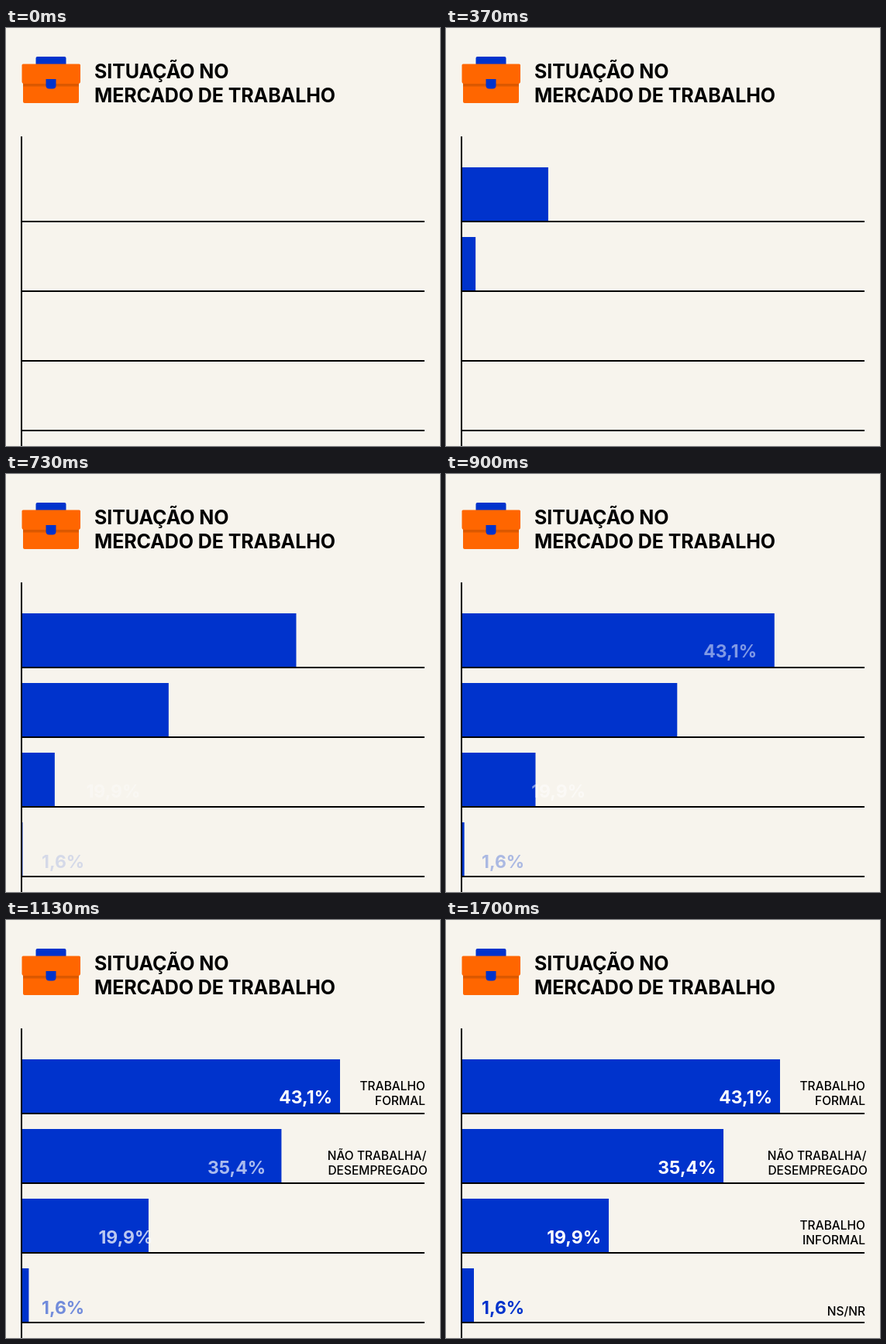
Write an HTML page that moves like this. It is 560x540 px and loops after 1.76 s.

```html
<!DOCTYPE html>
<html lang="pt-BR">
<head>
<meta charset="utf-8">
<title>Situação no mercado de trabalho</title>
<style>
  html, body { margin: 0; width: 100%; height: 100%; overflow: hidden; background: #f7f4ed; }
  svg { display: block; width: 560px; height: 540px; font-family: Inter, "Open Sans", sans-serif; }
  .title { font-size: 25px; font-weight: 700; letter-spacing: -.1px; }
  .value { font-size: 23px; font-weight: 700; }
  .label { font-size: 15.5px; font-weight: 500; }
  .value, .label { opacity: 0; }
  .end { text-anchor: end; }
  .white { fill: #fff; }
  .blue { fill: #0033cc; }
  .orange { fill: #ff6600; }
</style>
</head>
<body>
<svg viewBox="0 0 560 540">
  <g id="briefcase">
    <path class="blue" d="M38.500 47V39q0-2 2-2H75.500q2 0 2 2V47z"/>
    <path class="orange" d="M22 70H94V95q0 2-2 2H24q-2 0-2-2z"/>
    <path fill="#db5800" d="M22 69H94V75.500H22z"/>
    <path class="orange" d="M20.500 48q0-1.500 1.500-1.500H94.500q1.500 0 1.500 1.500V69q0 3-3 3H23.500q-3 0-3-3z"/>
    <path class="blue" d="M51.500 66H64.500V74q0 4.500-4.500 4.500H56q-4.500 0-4.500-4.500z"/>
  </g>
  <g class="title">
    <text x="114" y="65">SITUAÇÃO NO</text>
    <text x="114" y="96">MERCADO DE TRABALHO</text>
  </g>

  <g class="blue">
    <rect class="bar" x="21" y="180" height="70"/>
    <rect class="bar" x="21" y="270" height="70"/>
    <rect class="bar" x="21" y="360" height="70"/>
    <rect class="bar" x="21" y="450" height="70"/>
  </g>
  <path stroke="#000" stroke-width="2" d="M20 140V540M20 250H540M20 340H540M20 430H540M20 520H540"/>

  <text class="value white end" x="421" y="237">43,1%</text>
  <text class="value white end" x="348.500" y="328">35,4%</text>
  <text class="value white end" x="200" y="418">19,9%</text>
  <text class="value blue" x="46" y="508.500">1,6%</text>

  <g class="label end">
    <text x="541" y="220">TRABALHO</text>
    <text x="541" y="239">FORMAL</text>
  </g>
  <g class="label end">
    <text x="542.500" y="309.500">NÃO TRABALHA/</text>
    <text x="544" y="329">DESEMPREGADO</text>
  </g>
  <g class="label end">
    <text x="541" y="400">TRABALHO</text>
    <text x="541" y="418.500">INFORMAL</text>
  </g>
  <g class="label end">
    <text x="541" y="510.500">NS/NR</text>
  </g>
</svg>
<script>
  const LOOP = 1760, STEP = 100 / 3, SLIDE = 40;

  // Times in ms: bar growth starts at `bar`; value and label fade over [from, to].
  const rows = [
    { width: 410, bar: 0,   value: [800, 1000],  label: [900, 1100],  slide: SLIDE },
    { width: 337, bar: 200, value: [1000, 1200], label: [900, 1100],  slide: SLIDE },
    { width: 189, bar: 400, value: [400, 1400],  label: [1300, 1500], slide: SLIDE },
    { width: 15,  bar: 600, value: [600, 1600],  label: [1500, 1700], slide: 0 }
  ];
  const bars = document.querySelectorAll('.bar');
  const values = document.querySelectorAll('.value');
  const labels = document.querySelectorAll('.label');

  const progress = (t, from, to) => Math.min(1, Math.max(0, (t - from) / (to - from)));

  // cubic-bezier(.45, 0, .55, 1), solved by bisection
  function ease(x) {
    if (x <= 0 || x >= 1) return x;
    let lo = 0, hi = 1, u;
    for (let i = 0; i < 24; i++) {
      u = (lo + hi) / 2;
      const bx = 1.35 * (1 - u) ** 2 * u + 1.65 * (1 - u) * u * u + u ** 3;
      if (bx < x) lo = u; else hi = u;
    }
    return u * u * (3 - 2 * u);
  }

  function draw(t) {
    rows.forEach((row, i) => {
      bars[i].setAttribute('width', row.width * ease(progress(t, row.bar, row.bar + 1000)));
      const shown = progress(t, ...row.value);
      values[i].style.opacity = shown;
      values[i].setAttribute('transform', `translate(${row.slide * (shown - 1)} 0)`);
      labels[i].style.opacity = progress(t, ...row.label);
    });
  }

  // The motion is held at 30 steps per second; the empty chart lasts two steps.
  const start = performance.now();
  function tick() {
    const time = (performance.now() - start) % LOOP;
    const step = Math.floor((time + 3.4) / STEP);
    draw(step < 2 ? 0 : step * STEP);
    requestAnimationFrame(tick);
  }
  tick();
</script>
</body>
</html>
```
